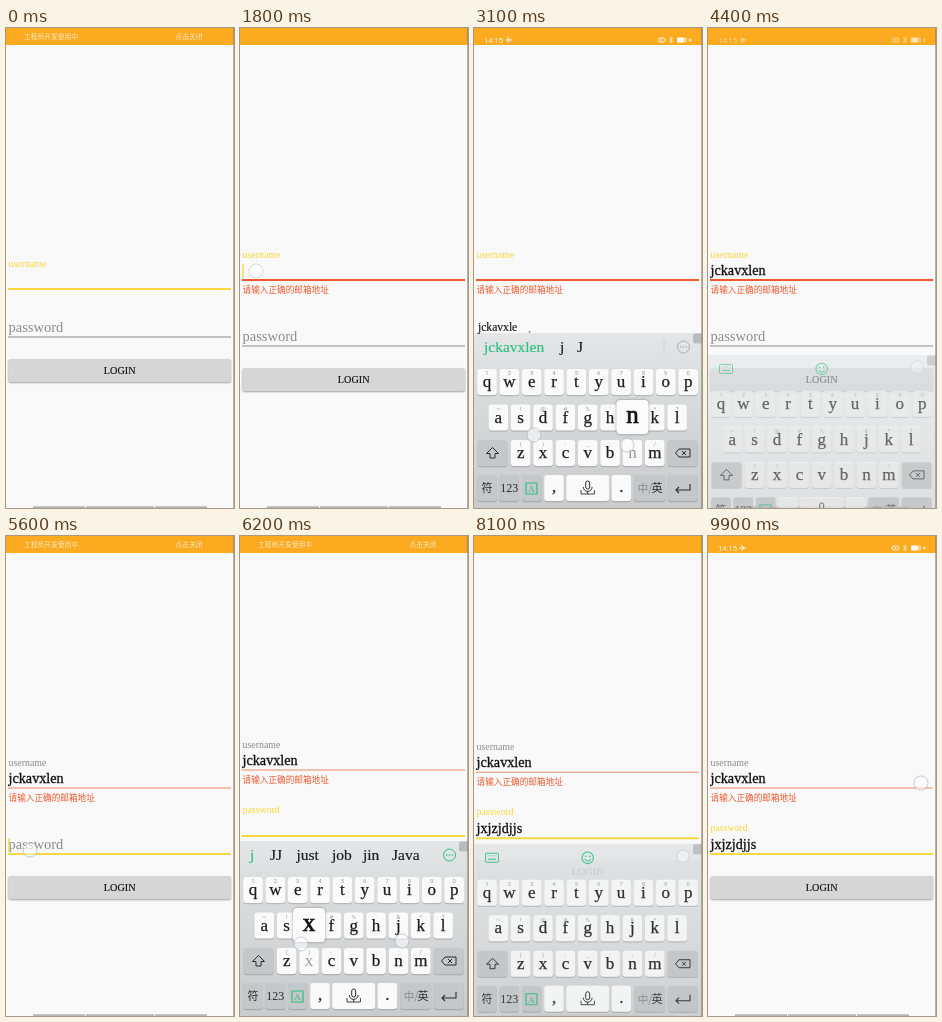
Animation of 228 by 480 pixels, one loop 10 s. Source, as an HTML page with a canvas:

```html
<!DOCTYPE html>
<html lang="zh">
<head>
<meta charset="utf-8">
<style>
html, body { margin: 0; width: 100%; height: 100%; overflow: hidden; background: #f9f9f9; }
canvas { display: block; width: 228px; height: 480px; }
</style>
</head>
<body>
<canvas id="stage"></canvas>
<script>
const W = 228, H = 480, LOOP = 10000;
const SERIF = '"Liberation Serif", serif';
const CJK = '"Noto Sans CJK SC", "Noto Sans CJK", sans-serif';
const YELLOW = '#fbd83c', GRAY = '#8b8b8b', RED = '#f0582f', GREEN = '#2fbf83';
const USER = 'jckavxlen', PASS = 'jxjzjdjjs';

const canvas = document.getElementById('stage');
const scale = window.devicePixelRatio || 1;
canvas.width = W * scale;
canvas.height = H * scale;
const c = canvas.getContext('2d');

const clamp = v => Math.max(0, Math.min(1, v));
const ramp = (t, a, b) => clamp((t - a) / (b - a));
const mix = (a, b, p) => a + (b - a) * p;

function text(s, x, y, size, color, o = {}) {
  c.font = `${o.weight || 400} ${size}px ${o.font || SERIF}`;
  c.textAlign = o.align || 'left';
  c.textBaseline = 'alphabetic';
  c.fillStyle = color;
  c.fillText(s, x, y);
  if (o.bold) {
    c.strokeStyle = color;
    c.lineWidth = o.bold;
    c.strokeText(s, x, y);
  }
}

function rect(x, y, w, h, color) {
  c.fillStyle = color;
  c.fillRect(x, y, w, h);
}

function round(x, y, w, h, r, color) {
  c.beginPath();
  c.roundRect(x, y, w, h, r);
  c.fillStyle = color;
  c.fill();
}

function path(points, color, width = 1, close = false) {
  c.beginPath();
  points.forEach(([x, y], i) => i ? c.lineTo(x, y) : c.moveTo(x, y));
  if (close) c.closePath();
  c.strokeStyle = color;
  c.lineWidth = width;
  c.stroke();
}

function ring(x, y, r, color, width = 1, from = 0, to = Math.PI * 2) {
  c.beginPath();
  c.arc(x, y, r, from, to);
  c.strokeStyle = color;
  c.lineWidth = width;
  c.stroke();
}

function dot(x, y, r, color) {
  c.beginPath();
  c.arc(x, y, r, 0, Math.PI * 2);
  c.fillStyle = color;
  c.fill();
}

function faded(alpha, draw) {
  if (alpha <= 0) return;
  c.save();
  c.globalAlpha *= alpha;
  draw();
  c.restore();
}

// Top bar: banner and clock take turns, every 6 s
function drawBanner() {
  const col = 'rgba(255,255,255,.72)';
  text('工程师开发使用中', 18, 11.3, 6.75, col, { font: CJK });
  text('点击关闭', 169.5, 11.3, 6.75, col, { font: CJK });
}

function drawStatus() {
  const col = 'rgba(255,255,255,.85)';
  text('14:15', 10, 14.6, 7.6, col, { font: 'Roboto, sans-serif' });
  path([[31.5, 12], [38, 12]], col, 1.1);
  path([[33.5, 9], [35.5, 12], [33.5, 15]], col, 1.1);
  c.beginPath();
  c.ellipse(187.5, 12, 3.6, 2.3, 0, 0, Math.PI * 2);
  c.strokeStyle = col;
  c.lineWidth = 1;
  c.stroke();
  dot(187.5, 12, 1, col);
  path([[195.3, 10.2], [198.8, 13.6], [197, 15], [197, 9], [198.8, 10.4], [195.3, 13.8]], col, .7);
  round(203, 9.6, 10, 5, 1.2, 'rgba(255,255,255,.45)');
  round(203, 9.6, 7, 5, 1.2, col);
  path([[214.5, 12], [218, 12]], col, .8);
  path([[216.2, 10.2], [216.2, 13.8]], col, .8);
}

function drawTop(t) {
  rect(0, 0, W, 17, '#fcaa20');
  const s = t % 6000;
  faded(t < 4800 ? 1 - ramp(s, 1200, 1700) : (t < 7200 ? ramp(t, 4900, 5400) : 1 - ramp(t, 7200, 7700)), drawBanner);
  faded(Math.min(ramp(s, 2100, 2600), 1 - ramp(s, 4200, 4700)), drawStatus);
}

const caret = (x, y) => rect(x, y - 7, 1.4, 14, '#fbd541');

function drawForm(t, shift) {
  const error = t >= 600, d = error ? 9 : 0;
  const u = 261 - d + shift, p = 309 + d + shift;
  const second = t >= 5600;

  text('username', 2.5, u - 22, 9.9, second ? GRAY : YELLOW);
  if (t >= 3500) text(USER, 2.5, u - 5, 14.2, '#111', { bold: .3 });
  if (!second) rect(2, u - 1, 223, 2, error ? RED : '#fdd83e');
  else rect(2, u - .5, 223, 1, '#f08a6b');
  if (error) faded(ramp(t, 500, 900), () =>
    text('请输入正确的邮箱地址', 2.5, u + 13, 8.65, RED, { font: CJK, weight: 500 }));
  if (!second && t >= 1500 && Math.floor(t / 500) % 2) caret(t >= 3500 ? 59.5 : 2.3, u - 9);

  const f = ramp(t, 5600, 5800);
  text('password', 2.5, mix(p - 5.5, p - 23, f), mix(14.5, 9.9, f), f > .4 ? YELLOW : GRAY);
  if (second) rect(2, p - 1, 223, 2, '#f5d944');
  else rect(2, p - .5, 223, 1, '#8e8e8e');
  if (t >= 7200) text(PASS, 2.5, p - 5, 14.2, '#111', { bold: .3 });
  if (second && t < 6100) caret(2.3, p - 9);
  if (t >= 7200 && Math.floor((t - 7200) / 500) % 2 === 0) caret(48.5, p - 9);

  c.save();
  c.shadowColor = 'rgba(0,0,0,.35)';
  c.shadowBlur = 2 * scale;
  c.shadowOffsetY = scale;
  round(2.5, p + 22, 222.5, 23, 2, '#d6d6d6');
  c.restore();
  text('LOGIN', 113.7, p + 36.5, 10.2, '#111', { align: 'center', bold: .15 });
}

function drawNav() {
  [[27, 52], [80, 68], [149, 52]].forEach(([x, w]) => rect(x, 478.3, w, 1.7, '#b3b3b3'));
}

// Keyboard
const ROWS = [
  { keys: 'qwertyuiop', hints: '1234567890', x: 13, y: 354 },
  { keys: 'asdfghjkl', hints: '~!@#%\'&*?', x: 24.3, y: 389.5 },
  { keys: 'zxcvbnm', hints: '()-_:;/', x: 46.7, y: 425 }
];
const PITCH = 22.35;

function keyPos(k) {
  for (const r of ROWS) {
    const i = r.keys.indexOf(k);
    if (i >= 0) return [r.x + i * PITCH, r.y];
  }
}

function keyBox(x, y, w, color) {
  round(x - w / 2, y - 12.2, w, 26.4, 3, 'rgba(0,0,0,.16)');
  round(x - w / 2, y - 13, w, 26, 3, color);
}

function drawKeys(pressed) {
  for (const r of ROWS) {
    [...r.keys].forEach((k, i) => {
      const x = r.x + i * PITCH;
      keyBox(x, r.y, 19.6, '#fafafa');
      text(r.hints[i], x, r.y - 6.6, 6, '#999', { align: 'center', font: 'Roboto, sans-serif' });
      const on = k === pressed;
      text(k, x, r.y + 5.2, 17, on ? '#999' : '#1c1c1c', { align: 'center', bold: on ? 0 : .25 });
    });
  }
  const dark = '#c5c8ca', ink = '#2b2b2b', y4 = 460;
  keyBox(18.5, 425, 30, dark);
  path([[18.5, 419.5], [24.5, 425.5], [21, 425.5], [21, 430], [16, 430], [16, 425.5], [12.5, 425.5]], ink, 1, true);
  keyBox(208.7, 425, 30, dark);
  path([[201.5, 425], [205, 421], [216, 421], [216, 429], [205, 429]], ink, 1, true);
  path([[208, 423], [212, 427]], ink);
  path([[212, 423], [208, 427]], ink);

  [[13, 19.6, dark], [35.3, 19.6, dark], [57.7, 19.6, dark], [80, 19.6, '#fafafa'], [113.7, 43, '#fafafa'],
   [147.3, 19.6, '#fafafa'], [175.6, 31, dark], [208.7, 30, dark]].forEach(([x, w, col]) => keyBox(x, y4, w, col));
  const mid = { align: 'center', font: CJK };
  text('符', 13, y4 + 4.2, 11, ink, mid);
  text('123', 35.3, y4 + 4.3, 12, ink, { align: 'center' });
  path([[52, 455], [63, 455], [63, 466], [52, 466]], GREEN, 1.2, true);
  text('A', 57.5, y4 + 4, 9, GREEN, { align: 'center' });
  text(',', 80, y4 + 4, 17, ink, { align: 'center', bold: .3 });
  text('.', 147.3, y4 + 4, 17, ink, { align: 'center', bold: .3 });
  c.beginPath();
  c.roundRect(111.7, 453, 4, 8, 2);
  c.strokeStyle = ink;
  c.lineWidth = 1;
  c.stroke();
  ring(113.7, 459, 4.4, ink, 1, 0, Math.PI);
  path([[113.7, 463.4], [113.7, 466]], ink);
  path([[107, 462], [107, 466], [120.4, 466], [120.4, 462]], ink, .9);
  text('中/', 171, y4 + 4, 10.5, '#888', mid);
  text('英', 183, y4 + 4.2, 11, ink, mid);
  path([[216, 456], [216, 462], [202, 462]], ink, 1.1);
  path([[205, 459], [202, 462], [205, 465]], ink, 1.1);
}

function drawPreview(k) {
  const [x, y] = keyPos(k), top = Math.max(y - 53, 318);
  c.save();
  c.shadowColor = 'rgba(0,0,0,.4)';
  c.shadowBlur = 3 * scale;
  round(x - 16, top, 32, 34, 4, '#fbfbfb');
  c.restore();
  text(k, x, top + 23, 25, '#111', { align: 'center', bold: .7 });
}

function drawBar(word) {
  const single = word.length === 1;
  if (word) {
    const list = single
      ? [['j', 10], ['JJ', 30], ['just', 56.5], ['job', 92], ['jin', 123], ['Java', 152]]
      : [[word, 10], ['j', 86], ['J', 103]];
    list.forEach(([s, x], i) => text(s, x, 324, 15.5, i ? '#1c1c1c' : GREEN, { bold: .2 }));
    if (!single) rect(189.5, 312, 1, 14, '#cdd0d2');
    const col = single ? GREEN : '#adb0b2';
    ring(209.5, 319, 6, col);
    [-2.7, 0, 2.7].forEach(d => dot(209.5 + d, 319, .8, col));
  } else {
    c.beginPath();
    c.roundRect(11.5, 314.5, 13, 9, 1);
    c.strokeStyle = GREEN;
    c.lineWidth = 1;
    c.stroke();
    [14, 16.7, 19.4, 22].forEach(x => rect(x - .5, 316.5, 1, 1, GREEN));
    path([[14, 320.5], [22, 320.5]], GREEN);
    ring(113.7, 319, 5.7, GREEN, 1.1);
    dot(111.7, 317.5, .8, GREEN);
    dot(115.7, 317.5, .8, GREEN);
    ring(113.7, 319.5, 2.9, GREEN, 1, .2, Math.PI - .2);
    dot(209, 317.5, 6.3, 'rgba(255,255,255,.45)');
    ring(209, 317.5, 6.3, '#c6c9cb', .8);
  }
}

function typing(t) {
  const first = t < 5000;
  const start = first ? 2300 : 6100, commit = first ? 3500 : 7200;
  const word = first ? USER : PASS;
  if (t < start || t >= commit) return { key: '', typed: '', word: '' };
  const i = Math.floor((t - start) / 100);
  return { key: word[i] || '', typed: word.slice(0, i), word: word.slice(0, first ? i + 1 : i) };
}

function keyboardPose(t) {
  const first = t < 5000;
  const inAt = first ? 1900 : 5600, outAt = first ? 4200 : 8000;
  if (t < outAt) return { y: 175 * (1 - ramp(t, inAt, inAt + 300)) ** 3, a: t > inAt ? 1 : 0 };
  const q = ramp(t, outAt, outAt + 400);
  return { y: 175 * q ** 3, a: 1 - 1.6 * q * q };
}

function drawKeyboard(t) {
  const pose = keyboardPose(t);
  if (pose.a <= 0) return;
  const s = typing(t);
  c.save();
  c.globalAlpha = pose.a;
  c.translate(0, pose.y);
  const g = c.createLinearGradient(0, 305, 0, H);
  g.addColorStop(0, '#e4e6e7');
  g.addColorStop(.2, '#dcdfe0');
  g.addColorStop(1, '#c9cbcc');
  rect(0, 305, W, 175, g);
  drawBar(s.word);
  drawKeys(s.key);
  round(219, 305.5, 10, 10, 2, '#b9bbbd');
  if (s.key) drawPreview(s.key);
  if (s.typed.length > 1) {
    c.font = `11.6px ${SERIF}`;
    round(2, 293, c.measureText(s.typed).width + 5, 12, 1, '#fdfdfd');
    text(s.typed, 4, 302.5, 11.6, '#1c1c1c', { bold: .2 });
  }
  c.restore();
}

// x, y, first and last moment
const TOUCHES = [
  [16, 243, 1500, 2000], [40, 319, 3300, 3700],
  [24, 314, 5400, 5900], [30, 319, 7100, 7500], [213, 247, 9900, 10400],
  [60, 407, 2400, 3400], [153, 417, 2300, 3400],
  [61, 408, 6200, 7200], [162, 405, 6100, 7200]
];

function drawTouches(t) {
  for (const [x, y, a, b] of TOUCHES) {
    if (t < a || t >= b) continue;
    faded(1 - ramp(t, b - 300, b), () => {
      dot(x, y, 7, 'rgba(255,255,255,.55)');
      ring(x, y, 7, 'rgba(165,175,200,.65)', 1);
    });
  }
}

function render(t) {
  c.setTransform(scale, 0, 0, scale, 0, 0);
  rect(0, 0, W, H, '#f9f9f9');
  const lift = t < 8000 ? ramp(t, 5650, 5900) : 1 - ramp(t, 8000, 8400) ** 1.5;
  drawForm(t, -18 * lift);
  drawNav();
  drawTop(t);
  drawKeyboard(t);
  drawTouches(t);
  rect(227, 0, 1, H, 'rgba(120,120,120,.55)');
}

const begin = performance.now();
function tick() {
  const t = (performance.now() - begin) % LOOP;
  render(Math.floor(t / 100) * 100);
  requestAnimationFrame(tick);
}
tick();
</script>
</body>
</html>
```
